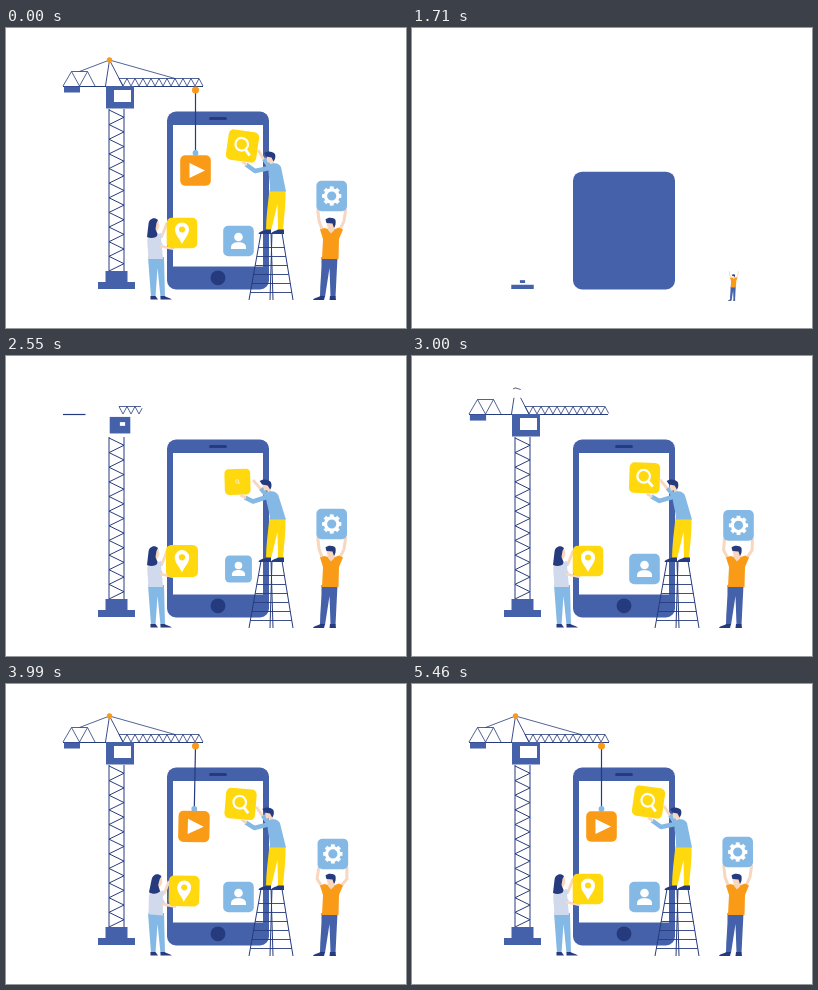
An HTML page with a canvas that plays this animation: 400x300 px, repeating every 5.49 s.

```html
<!DOCTYPE html>
<html lang="en">
<head>
<meta charset="utf-8">
<title>Building an app</title>
<style>
html, body { margin: 0; width: 100%; height: 100%; overflow: hidden; background: #fff; }
canvas { display: block; }
</style>
</head>
<body>
<canvas id="stage" width="400" height="300"></canvas>
<script>
const c = document.getElementById('stage').getContext('2d');
const LOOP = 5490, BUILD = 1590; // the scene is wiped and rebuilt at BUILD
const BLUE = '#4461a9', NAVY = '#263b7e', ORANGE = '#f99b17', YELLOW = '#ffd80d',
      SKY = '#85b9e5', SKIN = '#f8d6c0', LILAC = '#d1d9ec', WHITE = '#fff';
let T = 0;

const clamp = v => Math.min(1, Math.max(0, v));
const mix = (a, b, k) => a + (b - a) * k;
const part = (start, dur) => clamp((T - start) / dur);
const out = (start, dur) => 1 - (1 - part(start, dur)) ** 3;
const pop = (start, dur = 400) => {
  const v = part(start, dur) - 1;
  return v <= -1 ? 0 : 1 + 2.7 * v ** 3 + 1.7 * v * v;
};
// smooth value through [time, value] pairs
function keyed(keys) {
  let v = keys[0][1];
  for (let i = 1; i < keys.length; i++) {
    const [t0, a] = keys[i - 1], [t1, b] = keys[i];
    if (T < t0) break;
    const u = clamp((T - t0) / (t1 - t0));
    v = mix(a, b, u * u * (3 - 2 * u));
  }
  return v;
}

function fill(color, path) {
  c.fillStyle = color;
  c.fill(new Path2D(path));
}
function box(color, x, y, w, h, r = 0) {
  c.fillStyle = color;
  c.beginPath();
  c.roundRect(x, y, w, h, r);
  c.fill();
}
function dot(color, x, y, r) {
  if (r <= 0) return;
  c.fillStyle = color;
  c.beginPath();
  c.arc(x, y, r, 0, 7);
  c.fill();
}
// polyline drawn up to the share k of its length
function line(pts, color = NAVY, width = 1, k = 1) {
  if (k <= 0) return;
  let len = 0;
  c.beginPath();
  pts.forEach(([x, y], i) => {
    c.lineTo(x, y);
    if (i) len += Math.hypot(x - pts[i - 1][0], y - pts[i - 1][1]);
  });
  c.strokeStyle = color;
  c.lineWidth = width;
  c.setLineDash(k < 1 ? [len * k, len] : []);
  c.stroke();
  c.setLineDash([]);
}
// draws with (x, y) as the fixed point of scale and turn
function around(x, y, scale, turn, draw) {
  if (scale <= 0) return;
  c.save();
  c.translate(x, y);
  c.rotate(turn);
  c.scale(scale, scale);
  c.translate(-x, -y);
  draw();
  c.restore();
}
function icon(color, x, y, scale, turn, glyph, glyphScale = 1) {
  if (scale <= 0) return;
  c.save();
  c.translate(x, y);
  c.rotate(turn);
  c.scale(scale, scale);
  box(color, -15.3, -15.3, 30.6, 30.6, 5);
  c.scale(glyphScale, glyphScale);
  if (glyphScale > 0) glyph();
  c.restore();
}

const glyphs = {
  play: () => fill(WHITE, 'M-6-7.5 9.5 0-6 7.5Z'),
  lens() {
    c.strokeStyle = WHITE;
    c.lineWidth = 2.2;
    c.beginPath();
    c.arc(-1, -1.6, 6.3, 0, 7);
    c.stroke();
    line([[3.6, 3.2], [8.4, 8.4]], WHITE, 2.8);
  },
  pin() {
    fill(WHITE, 'M0 11C-2 6-7 2-7-3.5A7 7 0 0 1 7-3.5C7 2 2 6 0 11Z');
    dot(YELLOW, 0, -3.5, 3);
  },
  user() {
    dot(WHITE, 0, -4, 4.3);
    fill(WHITE, 'M-7.5 8V6.5C-7.5 2.5-4 1.2 0 1.2S7.5 2.5 7.5 6.5V8Z');
  },
  gear() {
    for (let i = 0; i < 8; i++) {
      const a = i * Math.PI / 4, x = Math.cos(a), y = Math.sin(a);
      line([[x * 6, y * 6], [x * 9.6, y * 9.6]], WHITE, 3.8);
    }
    c.lineWidth = 3.2;
    c.beginPath();
    c.arc(0, 0, 6.2, 0, 7);
    c.stroke();
  }
};

function phone() {
  const h = 178 * out(30, 300);
  if (h < 1) return;
  box(BLUE, 161, 261.5 - h, 102, h, 9);
  const s = out(220, 300);
  box(WHITE, 167, 238.5 - 141.5 * s, 90, 141.5 * s);
  const w = 18 * out(380, 300);
  box(NAVY, 212 - w / 2, 89, w, 3, 1.5);
  dot(NAVY, 212, 249.8, 7.4 * pop(380));
}

function crane() {
  // mast
  const zig = Array.from({ length: 23 }, (_, i) => [i % 2 ? 118 : 103, 243 - i * 7.32]);
  const mast = out(200, 780);
  for (const x of [103, 118]) line([[x, 243], [x, 81]], NAVY, 1, mast);
  line(zig, NAVY, 1, mast);
  around(110.5, 261, out(30, 340), 0, () => box(BLUE, 92, 254, 37, 7));
  around(110.5, 255, out(90, 360), 0, () => box(BLUE, 99.5, 243, 22, 12));

  // jib
  const truss = Array.from({ length: 22 }, (_, i) => [113 + i * 4, i % 2 ? 58 : 50.5]);
  const jib = out(900, 600), tail = out(1020, 450);
  line(truss, NAVY, 0.8, jib);
  line([[113, 50.5], [193, 50.5]], NAVY, 0.8, jib);
  line([[57, 58.5], [197, 58.5]], NAVY, 1.2, out(927, 600));
  line([[57, 58], [65.5, 43.5], [73.5, 58], [81.5, 43.5], [89, 58]], NAVY, 0.8, tail);
  line([[65.5, 43.5], [81.5, 43.5]], NAVY, 0.8, tail);
  around(66, 58, pop(1050), 0, () => box(BLUE, 58, 58.5, 16, 6));
  around(114, 69, pop(876), 0, () => box(BLUE, 100, 58, 28, 22.5));
  around(116.5, 68, pop(932), 0, () => box(WHITE, 108, 62, 17, 12));

  // peak and stays
  const peak = out(1300, 400);
  line([[99.5, 58], [103.5, 32]], NAVY, 0.9, peak);
  line([[117, 58], [103.5, 32]], NAVY, 0.9, peak);
  line([[103.5, 32], [73.5, 43.5]], NAVY, 0.8, out(1400, 400));
  line([[103.5, 32], [169, 50.5]], NAVY, 0.8, out(1400, 400));
  dot(ORANGE, 103.5, 32, 2.7 * pop(1380));
}

function hook() {
  const swing = T < 2050 ? 0
    : 0.025 * Math.sin((T - 2050) / 190) * (1 - part(2050, 1750));
  around(189.5, 62, 1, swing, () => {
    line([[189.5, 62], [189.5, 123.5]], NAVY, 1.2, out(1550, 380));
    dot(SKY, 189.5, 125, 2.9 * pop(1980));
    icon(ORANGE, 189.5, 142.5, pop(2050), 0, glyphs.play);
  });
  dot(ORANGE, 189.5, 62, 3.5 * pop(1480));
}

function woman() {
  const lean = keyed([[2050, 0], [2880, 1], [3020, 1], [3820, 0], [4660, 0], [5440, 1]]);
  const px = 176 + 5.5 * lean, py = 205 + 5 * lean;
  around(152, 271, out(300, 350), 0, () => {
    fill(SKY, 'M142 229H158L159 269H154.5L151.5 240 149.5 269H145Z');
    fill(NAVY, 'M144.5 268H149.5L152 271.5H144.5ZM154.5 268H158.5C161 270 164 269.5 166 271.5H154.5Z');
    around(150, 231, 1, 0.23 * lean, () => {
      fill(SKIN, 'M148 193H152.5L153.5 198 152 202 150 203 150 208H146Z');
      fill(LILAC, 'M145 206C149 204.5 153 206 155 210L157 231H142C143 223 140 214 142 209Z');
      fill(NAVY, 'M152 192C148 188.5 143 191 142.5 196L141 209C145 211 150 210 152 207L149.5 201 150.5 195Z');
    });
    const sx = 152 + 6 * lean, sy = 209 + lean;
    line([[sx, sy], [px - 20, py + 2]], LILAC, 5);
    line([[px - 20, py + 3], [px - 15, py - 10]], SKIN, 2.8);
    line([[sx - 2, sy + 3], [px - 21, py + 13]], LILAC, 5);
    line([[px - 22, py + 13], [px - 8, py + 16]], SKIN, 2.8);
  });
  icon(YELLOW, px, py, pop(640), 0.06 * lean, glyphs.pin);
}

function ladder() {
  const k = out(250, 400), foot = 272;
  if (!k) return;
  const legs = [[255, 243], [265, 267], [266, 264], [276, 287]];
  for (const [top, end] of legs) line([[end, foot], [top, 205]], NAVY, 1, k);
  for (let y = 264; y > 212; y -= 9) {
    const u = (y - 205) / 67;
    if (1 - u < k) line([[mix(255, 243, u), y + .5], [mix(276, 287, u), y + .5]], NAVY, 0.9);
  }
}

function climber() {
  const b = T < 1110 ? 0 : clamp(0.5 - 0.56 * Math.cos(Math.PI * (T - 1110) / 900));
  const rise = 5.5 * (1 - out(900, 300));
  const ix = mix(231.5, 236.5, b), iy = mix(123, 118, b) + rise;
  icon(YELLOW, ix, iy, pop(856), 0.14 * b - 0.01 * rise, glyphs.lens, pop(932));
  around(266, 206, out(400, 350), 0, () => {
    fill(YELLOW, 'M263.5 162H279.5C280 175 278 190 277 203H272L271.5 176 265 203H260C260 190 262 175 263.5 162Z');
    fill(NAVY, 'M252.5 206C253 203 258 203 260 201.5H265V206ZM265 206C266 203 270 203 272 201.5H278V206Z');
    line([[mix(259, 262, b), 138], [mix(247, 252, b), mix(124, 122, b)]], SKIN, 2.8);
    line([[mix(255, 258, b), mix(132.5, 131, b)], [mix(262, 266, b), 141]], SKY, 4.5);
    c.save();
    const skew = 0.11 * (1 - b);
    c.transform(1, 0, skew, 1, -skew * 164, 0);
    fill(SKIN, 'M261 128H268V137H264.5V134.5H261.5L260.5 131Z');
    fill(SKY, 'M263 137C268 134 273 135 275 139L280 163.5H264C265 155 261 145 263 137Z');
    fill(NAVY, 'M258 125C261 122.5 267 123 269 126 270 129 269 132 267.5 133.5L265.5 129.5 260 128.5Z');
    c.restore();
    const ey = mix(145.5, 143, b);
    line([[mix(264, 268, b), mix(140, 139, b)], [mix(247, 249, b), ey], [mix(239, 240, b), mix(141.5, 136.5, b)]], SKY, 4.5);
    line([[mix(240, 241, b), mix(142, 137, b)], [mix(234.5, 236, b), mix(139, 133.5, b)]], SKIN, 2.6);
  });
}

function lifter() {
  const d = keyed([[1000, 0], [1880, 1], [2050, 1], [2920, 0], [3920, 0], [4580, 1], [4750, 1], [5450, 0]]);
  const ix = 325.7 + 1.8 * d, iy = 168 + 3 * d;
  around(320, 273, out(60, 500), 0, () => {
    fill(BLUE, 'M315.5 229H331.5L329.5 269H324.5L323.5 240 319 269H314C314 255 316 242 315.5 229Z');
    fill(NAVY, 'M307 272C308 269.5 312 270 314 268H319L318 272ZM324 268H329.5L330 272H323.5Z');
    line([[317.5, 205], [mix(313, 310, d), mix(193, 196, d)], [ix - 14, iy + 13]], SKIN, 3);
    line([[332.5, 205], [mix(338, 342.5, d), mix(193, 196, d)], [ix + 14, iy + 13]], SKIN, 3);
    fill(ORANGE, 'M314 201.5 318.5 200 322 201H329L333 199.5 337 201.5 333 211 332.5 231H316L317 211Z');
    fill(SKIN, 'M320.5 194H328.5L328.5 202 325 205.5 322 202Z');
    fill(NAVY, 'M319.5 191.5C322 189 328 189.5 329.5 192 330 195 329.5 198 328 200L326.5 195.5 320.5 195Z');
  });
  icon(SKY, ix, iy, pop(480), 0, glyphs.gear);
}

function frame(now) {
  T = (now - BUILD + LOOP) % LOOP;
  if (T < 0) T += LOOP;
  c.clearRect(0, 0, 400, 300);
  phone();
  crane();
  hook();
  icon(SKY, 232.5, 213, pop(848), 0, glyphs.user);
  woman();
  ladder();
  climber();
  lifter();
}

c.lineJoin = 'round';
const begin = performance.now();
function tick() {
  frame(performance.now() - begin);
  requestAnimationFrame(tick);
}
tick();
</script>
</body>
</html>
```
